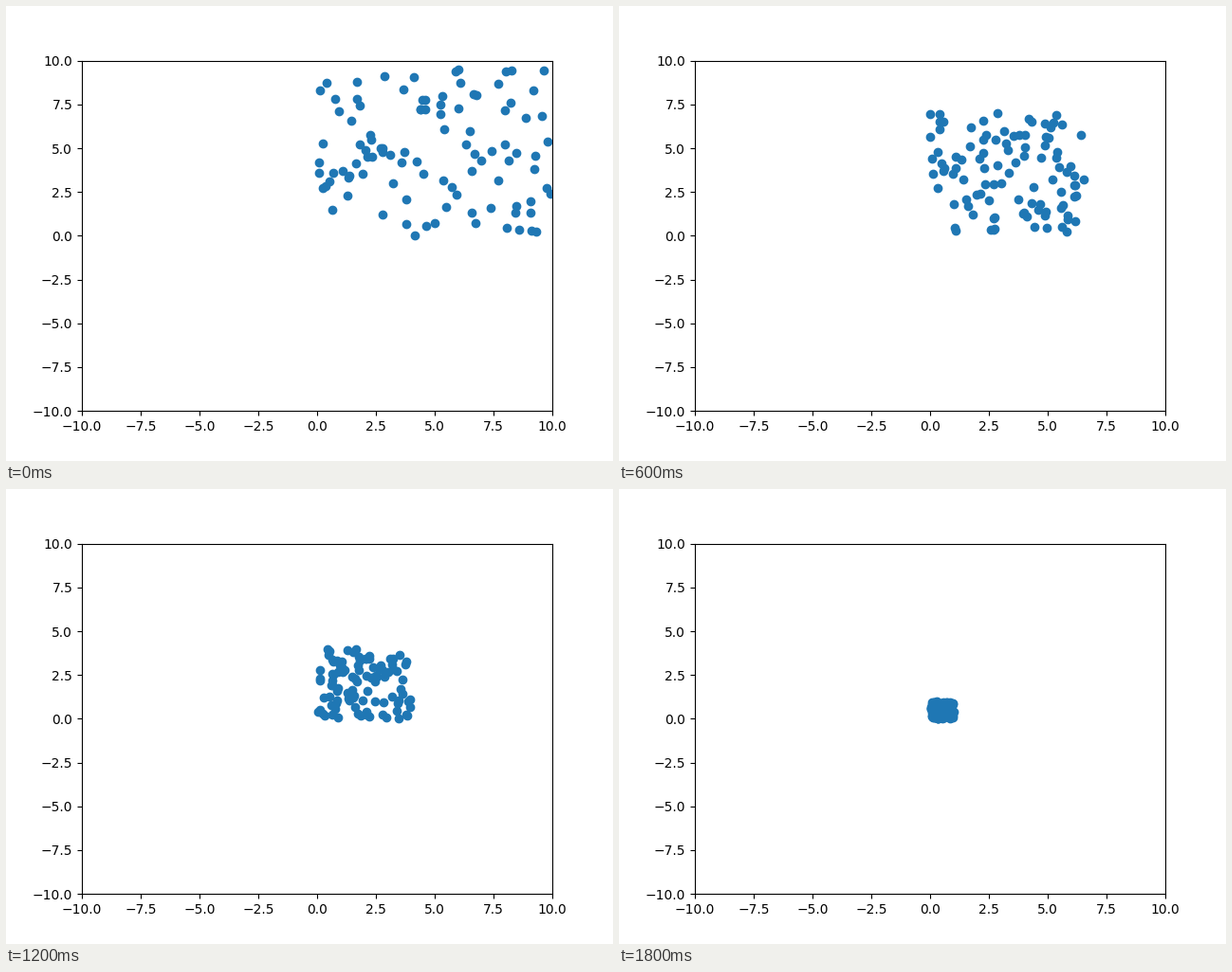
Write a matplotlib script that moves like this. It is 640 by 480 pixels and loops after 2000 ms.

```python
import numpy as np
import matplotlib.pyplot as plt
from matplotlib.animation import FuncAnimation

FRAMES = 10
INTERVAL = 200
POINTS = 100
LIMIT = 10

# Uniform points in a square whose side shrinks by one each step.
np.random.seed(7)
clouds = [np.random.uniform(0, LIMIT - step, (POINTS, 2))
          for step in range(FRAMES)]

fig, ax = plt.subplots(figsize=(6.4, 4.8), dpi=100)
ax.set_xlim(-LIMIT, LIMIT)
ax.set_ylim(-LIMIT, LIMIT)
scatter = ax.scatter(clouds[0][:, 0], clouds[0][:, 1], color="#1f77b4")


def update(step):
    scatter.set_offsets(clouds[step])
    return (scatter,)


anim = FuncAnimation(fig, update, frames=FRAMES, interval=INTERVAL,
                     repeat=True, repeat_delay=0)
plt.show()
```
